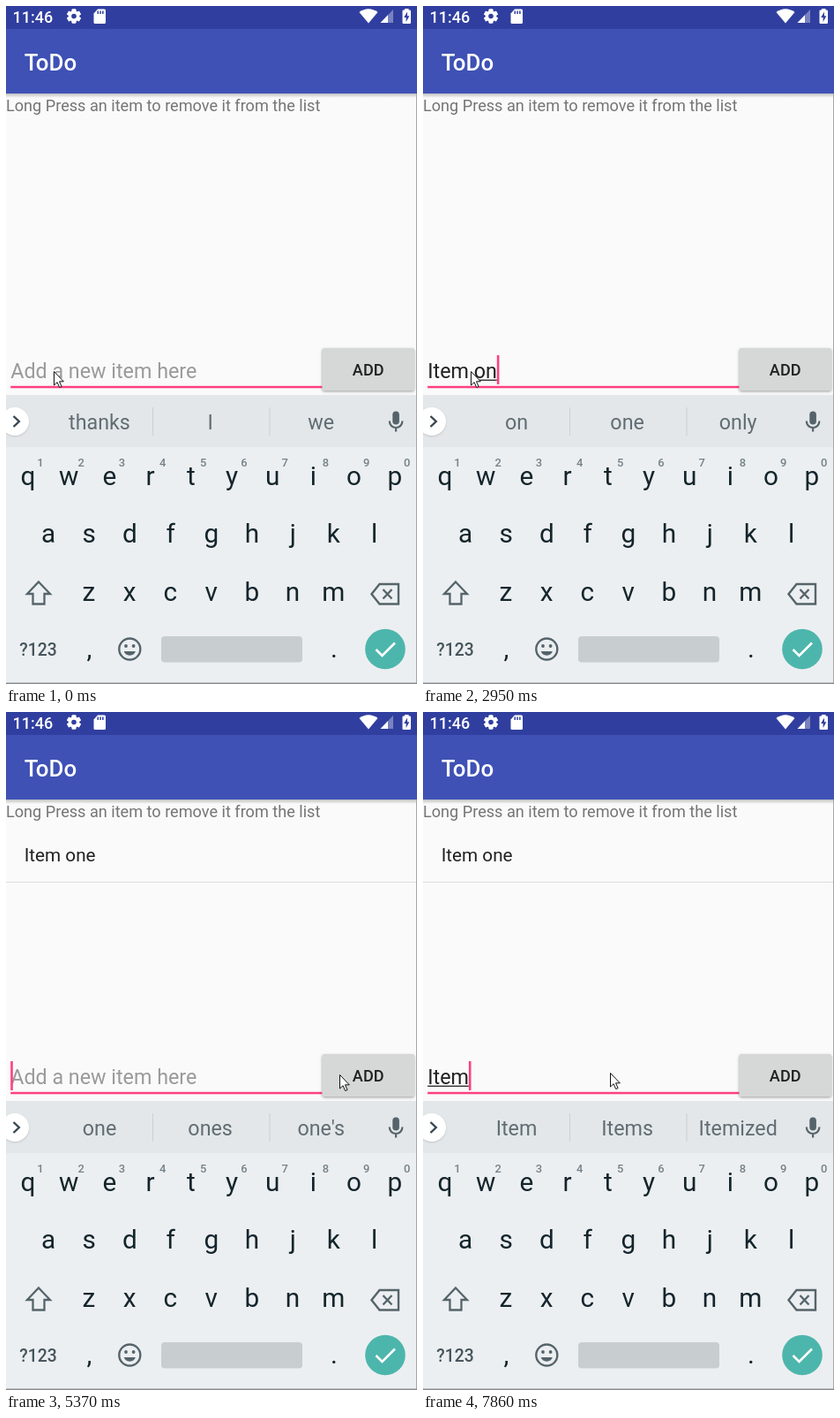
An HTML page with a canvas that plays this animation: 466x767 px, repeating every 7990 ms.

```html
<!DOCTYPE html>
<html lang="en">
<head>
<meta charset="utf-8">
<title>To-do list</title>
<style>
  html, body { margin: 0; width: 100%; height: 100%; overflow: hidden; background: #fafafa; }
  canvas { display: block; width: 466px; height: 767px; }
</style>
</head>
<body>
<canvas id="stage" width="466" height="767"></canvas>
<script>
const ctx = document.getElementById('stage').getContext('2d');
const LOOP = 7990;
const SP = 1.294; // pixels per density-independent unit
const PINK = '#ff4081', TEAL = '#4db6ac', ICON = '#55646b', KEY = '#14252c';
const ONE = ['one', 'ones', "one's"], ITEM = ['Item', 'Items', 'Itemized'];

const start = {
  done: '', word: '', caret: false, tips: ['thanks', 'I', 'we'],
  mouse: [54, 413], listed: false, ripple: null, toast: 0
};

// Each entry changes part of the state from its time on.
const events = [
  [270, { caret: true }],
  [690, { word: 'I' }],
  [830, { tips: ['I', "I'm", 'It'] }],
  [970, { word: 'It' }],
  [1110, { word: 'Ite' }],
  [1250, { tips: ['Ite', 'Item', 'Items'] }],
  [1550, { caret: false }],
  [1820, { word: 'Item', caret: true }],
  [1940, { tips: ITEM }],
  [2100, { done: 'Item ', word: '', tips: ['number', 'is', 'for'] }],
  [2410, { word: 'o', tips: ['o', 'of', 'our'] }],
  [2950, { word: 'on', tips: ['on', 'one', 'only'] }],
  [3090, { word: 'one', tips: ONE }],
  [3470, { mouse: [62, 417] }],
  [3600, { mouse: [100, 426], caret: false }],
  [3740, { mouse: [178, 420] }],
  [3890, { mouse: [243, 407] }],
  [4040, { mouse: [300, 406] }],
  [4170, { mouse: [345, 408] }],
  [4300, { mouse: [370, 410] }],
  [4440, { mouse: [378, 410] }],
  [4970, { ripple: { x: 390, r: 45, a: 0.1 } }],
  [5100, { ripple: { x: 402, r: 62, a: 0.1 } }],
  [5230, { ripple: { x: 410, r: 80, a: 0.06 } }],
  [5360, { done: '', word: '', caret: true, listed: true, ripple: null }],
  [5490, { mouse: [352, 420] }],
  [5620, { mouse: [296, 428] }],
  [5750, { mouse: [238, 416] }],
  [5880, { mouse: [212, 408] }],
  [6030, { caret: false, toast: 0.3, tips: ['Suggest contacts? Tap for info.'] }],
  [6160, { toast: 0.6 }],
  [6310, { toast: 0.85 }],
  [6460, { toast: 1 }],
  [7180, { caret: true }],
  [7330, { word: 'I', toast: 0.8, tips: ['I', "I'm", 'It'] }],
  [7460, { word: 'It', toast: 0.5 }],
  [7590, { word: 'Ite', toast: 0.25, tips: ['Ite', 'Item', 'Items'] }],
  [7730, { word: 'Item', toast: 0 }],
  [7860, { tips: ITEM }]
];

function stateAt(t) {
  const past = events.filter(([time]) => time <= t).map(([, patch]) => patch);
  return Object.assign({}, start, ...past);
}

function rect(x, y, w, h, color) {
  ctx.fillStyle = color;
  ctx.fillRect(x, y, w, h);
}

function round(x, y, w, h, r, color) {
  ctx.beginPath();
  ctx.roundRect(x, y, w, h, r);
  ctx.fillStyle = color;
  ctx.fill();
}

function disc(x, y, r, color) {
  ctx.beginPath();
  ctx.arc(x, y, r, 0, Math.PI * 2);
  ctx.fillStyle = color;
  ctx.fill();
}

function trace(d, color, width) {
  const path = new Path2D(d);
  if (width) {
    ctx.lineWidth = width;
    ctx.strokeStyle = color;
    ctx.stroke(path);
  } else {
    ctx.fillStyle = color;
    ctx.fill(path);
  }
}

function text(str, x, y, size, color, align = 'left', weight = 400) {
  ctx.font = `${weight} ${size}px Roboto, sans-serif`;
  ctx.textAlign = align;
  ctx.fillStyle = color;
  ctx.fillText(str, x, y);
  return ctx.measureText(str).width;
}

function shadow(color, blur, dy) {
  ctx.shadowColor = color;
  ctx.shadowBlur = blur;
  ctx.shadowOffsetY = dy;
}

function drawGear(x, y) {
  ctx.save();
  ctx.translate(x, y);
  for (let i = 0; i < 6; i++) {
    round(-2.4, -8, 4.8, 16, 1, '#fff');
    ctx.rotate(Math.PI / 3);
  }
  disc(0, 0, 6.2, '#fff');
  disc(0, 0, 2.8, '#303f9f');
  ctx.restore();
}

function drawHeader() {
  const shade = ctx.createLinearGradient(0, 98, 0, 104);
  shade.addColorStop(0, 'rgba(0,0,0,.28)');
  shade.addColorStop(1, 'rgba(0,0,0,0)');
  rect(0, 98, 466, 6, shade);
  rect(0, 0, 466, 26, '#303f9f');
  rect(0, 26, 466, 73, '#3f51b5');

  text('11:46', 7.5, 18.5, 18, '#fff', 'left', 500);
  drawGear(77, 11.5);
  trace('M104 3.5H111.5Q113 3.5 113 5V18.5Q113 20 111.5 20H101Q99.5 20 99.5 18.5V8.5Z', '#fff');
  for (let i = 0; i < 3; i++) rect(103.5 + i * 2.8, 5.5, 1.5, 3.5, '#303f9f');
  trace('M411 19.5L400.5 7Q411 -0.5 421.5 7Z', '#fff');
  trace('M439 4V19H424.5Z', 'rgba(255,255,255,.35)');
  trace('M433 10.2V19H424.5Z', '#fff');
  round(449.5, 4.5, 9.5, 15.5, 1.2, '#fff');
  rect(452, 3, 4.5, 2, '#fff');
  trace('M455 6.5L451.2 13H453.6V18L457.4 11.3H455Z', '#303f9f');

  text('ToDo', 20.7, 73, 20 * SP, '#fff', 'left', 500);
}

function drawInput(s) {
  const size = 18 * SP, left = 5.2;
  rect(left, 429.8, 353.5, 2.5, PINK);
  if (s.done + s.word) {
    const doneW = text(s.done, left, 421, size, '#212121');
    const wordW = text(s.word, left + doneW, 421, size, '#212121');
    if (wordW) rect(left + doneW, 422.6, wordW, 1.3, '#212121');
    if (s.caret) rect(left + doneW + wordW, 395, 2.6, 33, PINK);
  } else {
    text('Add a new item here', left, 421, size, '#9a9a9a');
    if (s.caret) rect(left, 395, 2.6, 33, PINK);
  }
}

function drawButton(ripple) {
  ctx.save();
  if (ripple) shadow('rgba(0,0,0,.4)', 8, 3);
  else shadow('rgba(0,0,0,.35)', 3, 1.2);
  round(358.5, 387, 104.5, 48, 2.6, '#d6d7d7');
  ctx.restore();
  if (ripple) {
    ctx.save();
    ctx.beginPath();
    ctx.roundRect(358.5, 387, 104.5, 48, 2.6);
    ctx.clip();
    disc(ripple.x, 411, ripple.r, `rgba(0,0,0,${ripple.a})`);
    ctx.restore();
  }
  text('ADD', 410.7, 417.5, 14 * SP, '#212121', 'center', 500);
}

function drawTips(tips) {
  rect(0, 440, 466, 59, '#e3e7e9');
  ctx.save();
  shadow('rgba(0,0,0,.15)', 2, 1);
  disc(10, 470, 16, '#fff');
  ctx.restore();
  trace('M8.5 464L14.8 470L8.5 476', '#37474f', 2.4);
  if (tips.length === 1) {
    text(tips[0], 232, 478, 16 * SP, '#47b5a8', 'center');
  } else {
    tips.forEach((tip, i) => text(tip, 106 + i * 125.6, 479, 18 * SP, '#616d73', 'center'));
    rect(166, 454, 1, 32, '#cbd0d3');
    rect(298.5, 454, 1, 32, '#cbd0d3');
  }
  round(438.3, 458.5, 7.6, 15, 3.8, ICON);
  trace('M434.8 469.5C434.8 479.5 449.4 479.5 449.4 469.5M442.1 477V481.5', ICON, 2.2);
}

function drawKeys() {
  rect(0, 499, 466, 268, '#eceff1');
  const rows = [['qwertyuiop', 25, 542], ['asdfghjkl', 48, 607], ['zxcvbnm', 94, 673]];
  for (const [letters, x, y] of rows) {
    [...letters].forEach((c, i) => text(c, x + i * 46.2, y, 23 * SP, KEY, 'center'));
  }
  [...'1234567890'].forEach((n, i) => text(n, 39 + i * 46.2, 520.5, 10 * SP, '#74818a', 'center', 500));

  trace('M37 651.5L50 665H43.5V676.5H30.5V665H24Z', ICON, 2.3);
  trace('M423.5 654H445V676.5H423.5L414.5 665.2Z', ICON, 2.4);
  trace('M427.5 660L437.5 670.5M437.5 660L427.5 670.5', ICON, 2.4);

  text('?123', 36.5, 735, 15 * SP, '#46555c', 'center', 500);
  text(',', 94.5, 737, 23 * SP, KEY, 'center');
  text('.', 372, 737, 23 * SP, KEY, 'center');
  trace('M152.3 727.5A12 12 0 1 1 128.3 727.5A12 12 0 1 1 152.3 727.5', ICON, 2.4);
  disc(136, 724, 1.9, ICON);
  disc(144.6, 724, 1.9, ICON);
  trace('M133.7 730A7 7 0 0 0 146.9 730Z', ICON);
  round(176, 713, 160, 29.5, 4, '#c8cdd0');
  disc(430, 727.5, 22.8, TEAL);
  trace('M419.5 728L426.5 735L441 720.5', '#fff', 2.6);
}

function drawToast(alpha) {
  if (!alpha) return;
  ctx.save();
  ctx.globalAlpha = alpha;
  round(137, 670.5, 192, 64.5, 32, '#eeeeee');
  text('Item added to list', 233, 709, 14 * SP, '#323232', 'center');
  ctx.restore();
}

function drawMouse([x, y]) {
  ctx.save();
  ctx.translate(x + 0.5, y + 0.5);
  const arrow = 'M0 0V15.5L3.6 12.2L6.2 18L8.6 17L6 11.3H10.8Z';
  trace(arrow, '#fff');
  trace(arrow, '#111', 1);
  ctx.restore();
}

function draw(t) {
  const s = stateAt(t);
  rect(0, 0, 466, 767, '#fafafa');
  drawHeader();
  text('Long Press an item to remove it from the list', 0, 119, 14 * SP, '#757575');
  if (s.listed) {
    text('Item one', 20.7, 168.5, 16 * SP, '#212121');
    rect(0, 192, 466, 1, '#dcdcdc');
  }
  drawInput(s);
  drawButton(s.ripple);
  drawTips(s.tips);
  drawKeys();
  drawToast(s.toast);
  rect(465, 99, 1, 668, '#a5a7a8');
  rect(0, 765.5, 466, 1.5, '#8b8e90');
  drawMouse(s.mouse);
}

function tick() {
  draw(performance.now() % LOOP);
  requestAnimationFrame(tick);
}
tick();
</script>
</body>
</html>
```
